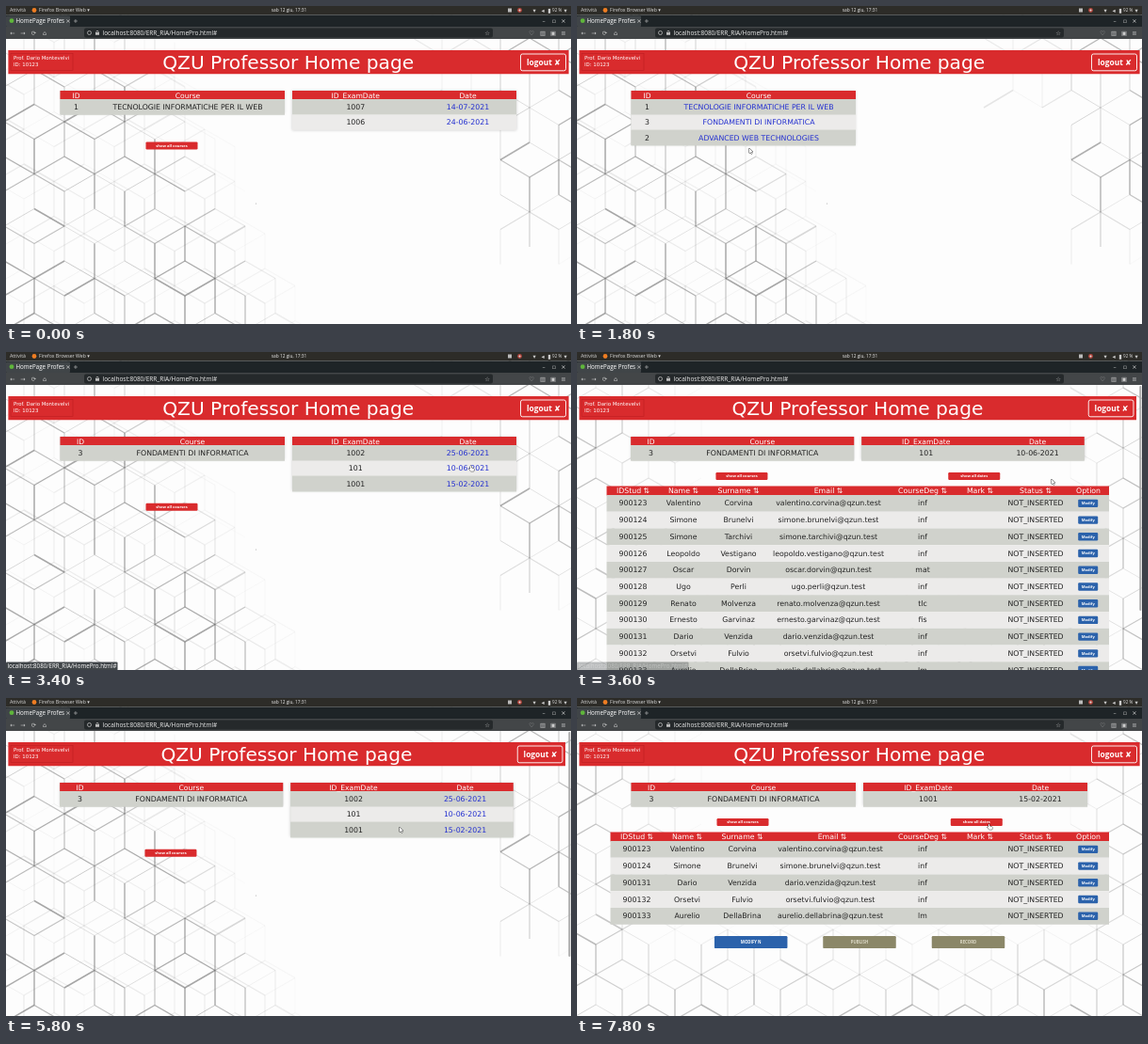
Write an HTML page with a canvas that moves like this. It is 600 px wide and 338 px high and loops after 8000 ms.

```html
<!DOCTYPE html>
<html lang="it">
<head>
<meta charset="utf-8">
<title>Professor Home page</title>
<style>
  html, body { margin: 0; width: 100%; height: 100%; overflow: hidden; background: #fff; }
  canvas { display: block; width: 600px; height: 338px; }
</style>
</head>
<body>
<canvas id="stage" width="600" height="338"></canvas>
<script>
const ctx = document.getElementById('stage').getContext('2d');
const LOOP = 8000, STEP = 200;
const WIDE = '"DejaVu Sans", sans-serif', UI = '"Open Sans", "Noto Sans", sans-serif';
const RED = '#d92b2d', BLUE = '#2b62ab', OLIVE = '#8b8768', LINK = '#2430d0', INK = '#222';
const STRIPES = ['#d0d2cc', '#ecebea'];
const URL_TEXT = 'localhost:8080/ERR_RIA/HomePro.html#';
const BODY = 7.8;

const FIRST = { id: 1, name: 'TECNOLOGIE INFORMATICHE PER IL WEB', dates: [['1007', '14-07-2021'], ['1006', '24-06-2021']] };
const BASICS = { id: 3, name: 'FONDAMENTI DI INFORMATICA', dates: [['1002', '25-06-2021'], ['101', '10-06-2021'], ['1001', '15-02-2021']] };
const WEB = { id: 2, name: 'ADVANCED WEB TECHNOLOGIES' };

const STUDENTS = [
  'Valentino Corvina inf', 'Simone Brunelvi inf', 'Simone Tarchivi inf', 'Leopoldo Vestigano inf',
  'Oscar Dorvin mat', 'Ugo Perli inf', 'Renato Molvenza tlc', 'Ernesto Garvinaz fis',
  'Dario Venzida inf', 'Orsetvi Fulvio inf', 'Aurelio DellaBrina lm', 'Marta Colvessi inf', 'Elisa Trondavi mat'
].map((line, i) => {
  const [first, last, degree] = line.split(' ');
  const email = `${first}.${last}@qzun.test`.toLowerCase();
  return [900123 + i, first, last, email, degree, '', 'NOT_INSERTED'];
});
const SHORT_LIST = [0, 1, 8, 9, 10].map(i => STUDENTS[i]);

// Each view lasts until its end time; k is the page width left beside the scrollbar.
const NARROW = 0.994;
const VIEWS = [
  { end: 1400, course: FIRST, k: 1 },
  { end: 2400, courses: [FIRST, BASICS, WEB], k: 1 },
  { end: 3600, course: BASICS, k: 1 },
  { end: 5800, course: BASICS, exam: 1, students: STUDENTS, k: NARROW },
  { end: 6200, course: BASICS, k: NARROW },
  { end: 6600, course: BASICS, k: 1 },
  { end: LOOP, course: BASICS, exam: 2, students: SHORT_LIST, k: 1 }
];

// time, x, y of the pointer
const POINTER = [
  [0, 505, -12], [200, 502, 6], [600, 491, 106], [1000, 240, 140], [1200, 182, 147], [1400, 182, 147],
  [1800, 183, 151], [2200, 192, 123], [2500, 192, 123], [3000, 466, 121], [3400, 493, 121],
  [3600, 504, 135], [4000, 515, 170], [4800, 512, 170], [5400, 425, 140], [5600, 414, 132],
  [5800, 418, 137], [6200, 487, 137], [6600, 488, 139], [7000, 300, 220], [7200, 209, 253],
  [7400, 541, 229], [7600, 470, 170], [7800, 437, 134], [LOOP, 437, 134]
];

const clamp = v => Math.max(0, Math.min(1, v));
const within = (t, ranges) => ranges.some(([a, b]) => t >= a && t < b);
const random = n => { const v = Math.sin(n * 12.9898) * 43758.5453; return v - Math.floor(v); };

function rect(x, y, w, h, color, radius = 0) {
  ctx.fillStyle = color;
  ctx.beginPath();
  ctx.roundRect(x, y, w, h, radius);
  ctx.fill();
}

function dot(x, y, r, color) {
  rect(x - r, y - r, 2 * r, 2 * r, color, r);
}

// y is the middle of the capital letters
function text(s, x, y, size, color = INK, align = 'center', font = WIDE, weight = '') {
  ctx.font = `${weight} ${size}px ${font}`;
  ctx.textAlign = align;
  ctx.fillStyle = color;
  ctx.fillText(s, x, y + size * 0.36);
}

function button(s, x, y, w, h, color, size = 4.1, ink = '#fff') {
  rect(x - w / 2, y - h / 2, w, h, color, 1.2);
  text(s, x, y, size, ink, 'center', UI, 'bold');
}

function pointerAt(t) {
  const i = Math.max(1, POINTER.findIndex(p => p[0] >= t));
  const [t0, x0, y0] = POINTER[i - 1], [t1, x1, y1] = POINTER[i];
  const p = (t - t0) / (t1 - t0);
  return [x0 + (x1 - x0) * p, y0 + (y1 - y0) * p];
}

// Lattice of wireframe cubes, fading by weight(x, y)
function cubes(cx, cy, half, side, strength, weight, seed) {
  const low = side / 2;
  const edges = [
    [0, 0, -half, -low], [0, 0, half, -low], [0, 0, 0, side],
    [0, -side, half, -low], [half, -low, half, low], [half, low, 0, side]
  ];
  for (let row = -8; row < 10; row++) for (let col = -10; col < 14; col++) {
    const x = cx + col * 2 * half + (row & 1) * half, y = cy + row * 1.5 * side;
    edges.forEach(([ax, ay, bx, by], e) => {
      const shade = random(seed + row * 131 + col * 17 + e * 3.7);
      const alpha = strength * clamp(weight(x + (ax + bx) / 2, y + (ay + by) / 2)) * (0.4 + 0.6 * shade);
      if (alpha < 0.02) return;
      ctx.strokeStyle = `rgba(95,95,95,${alpha})`;
      ctx.lineWidth = 0.7 + 0.8 * shade;
      ctx.beginPath();
      ctx.moveTo(x + ax, y + ay);
      ctx.lineTo(x + bx, y + by);
      ctx.stroke();
    });
  }
}

function background(students) {
  if (students) {
    const edge = (x, y) => Math.max(1 - x / 140, (x - 510) / 80, (y - 225) / 110);
    cubes(20, 70, 28, 32, 0.45, edge, 5);
    return;
  }
  const left = (x, y) => (165 + 0.5 * (y - 35) - x) / 70;
  const right = (x, y) => Math.min((270 - y) / 70, Math.max((x - 515) / 25, x > 440 && y < 115 ? 0.3 : 0));
  cubes(190, 197, 32, 37, 0.55, left, 1);
  cubes(211, 205, 32, 37, 0.13, (x, y) => left(x - 25, y), 40);
  cubes(556, 182, 31, 37, 0.5, right, 9);
  dot(265.5, 210, 0.6, '#aaa');
}

function table(x0, x1, heads, columns, rows, linked, k) {
  const x = x0 * k, w = (x1 - x0) * k, bottom = 99 + rows.length * 16.4;
  ctx.shadowColor = 'rgba(0,0,0,.2)';
  ctx.shadowBlur = 3;
  rect(x, 90, w, bottom - 90, STRIPES[1 - rows.length % 2]);
  ctx.shadowBlur = 0;
  rect(x, 90, w, 9, RED);
  rows.forEach((row, i) => {
    const y = 99 + i * 16.4;
    rect(x, y, w, 16.4, STRIPES[i % 2]);
    text(row[0], columns[0] * k, y + 8.2, BODY);
    text(row[1], columns[1] * k, y + 8.2, BODY, linked ? LINK : INK);
  });
  heads.forEach((s, i) => text(s, columns[i] * k, 94.8, 7.6, '#fff'));
  return bottom;
}

function studentTable(students, k) {
  const left = k < 1 ? 31.5 : 35.5, shift = k < 1 ? 0 : 4;
  const columns = [59.5, 113, 171.5, 267, 367, 428, 487, 543].map((x, i) => x + (i < 4 ? shift : 0));
  const top = 152, pitch = 17.72;
  rect(left, 142.5, 565 - left, 10, RED);
  ['IDStud', 'Name', 'Surname', 'Email', 'CourseDeg', 'Mark', 'Status', 'Option'].forEach((s, i) =>
    text(i < 7 ? s + ' ⇅' : s, columns[i], 147.3, 7.8, '#fff'));
  students.forEach((row, i) => {
    const y = top + i * pitch, middle = y + pitch / 2;
    rect(left, y, 565 - left, pitch + 0.1, STRIPES[i % 2]);
    row.forEach((s, c) => text(s, columns[c] - (c === 3 ? shift / 2 : 0), middle - 0.3, BODY));
    button('Modify', 542.7, middle, 21, 8.4, BLUE);
  });
  const y = top + students.length * pitch + 19;
  button('MODIFY N', 184.7 * k, y, 77.5, 13, BLUE, 4.3);
  button('PUBLISH', 300 * k, y, 77.5, 13, OLIVE, 4.3, '#dedbc8');
  button('RECORD', 415.5 * k, y, 77.5, 13, OLIVE, 4.3, '#dedbc8');
}

function banner(k) {
  rect(2.4 * k, 47, 595.2 * k, 25.3, RED);
  ctx.strokeStyle = 'rgba(170,20,25,.6)';
  ctx.lineWidth = 0.6;
  ctx.strokeRect(5, 50.5, 66, 18);
  text('Prof. Dario Montevelvi', 8, 55.3, 5.4, '#fff', 'left');
  text('ID: 10123', 8, 61.8, 5.4, '#fff', 'left');
  text('QZU Professor Home page', 299.7 * k, 59.8, 20.2, '#fff');
  ctx.strokeStyle = '#fff';
  ctx.lineWidth = 0.9;
  ctx.beginPath();
  ctx.roundRect(546.5 * k, 51, 48 * k, 17.8, 2);
  ctx.stroke();
  text('logout ✘', 571 * k, 60, 8.4, '#fff', 'center', UI + ', "DejaVu Sans"', 'bold');
}

function page(view) {
  const { course, courses, exam, students, k } = view;
  background(students);
  banner(k);
  const columns = courses || course === FIRST ? [74.5, 193] : [79, 198];
  const list = courses || [course];
  table(57.5, 296, ['ID', 'Course'], columns, list.map(c => [c.id, c.name]), Boolean(courses), k);
  if (courses) return;
  const picked = exam !== undefined;
  const dates = picked ? [course.dates[exam]] : course.dates;
  const bottom = table(304, 542, ['ID_ExamDate', 'Date'], picked ? [373, 492] : [371.3, 490.5], dates, !picked, k);
  button('show all courses', 176 * k, bottom + 16.6, 55, 8, RED);
  if (!picked) return;
  button('show all dates', 424.3 * k, bottom + 16.6, 55, 8, RED);
  studentTable(students, k);
}

function browser() {
  rect(0, 0, 600, 9.5, '#2d2c28');
  rect(0, 9.5, 600, 12.5, '#1e2427');
  rect(0, 10.5, 68, 11.5, '#404548', 1);
  rect(0, 22, 600, 13, '#434648');
  rect(83, 23.5, 434, 10, '#25292b', 2);

  const note = (s, x, y, size = 5.2, color = '#ddd', align = 'left') => text(s, x, y, size, color, align, UI);
  note('Attività', 4, 4.5);
  dot(30, 4.5, 2.4, '#ef7d22');
  note('Firefox Browser Web ▾', 35, 4.5);
  note('sab 12 giu, 17:31', 300.5, 4.5, 4.8, '#eee', 'center');
  note('92 %', 580, 4.5, 4.6);
  rect(533, 2.5, 4, 4, '#bbb');
  dot(545.5, 4.5, 2.4, '#b5463d');
  dot(545.5, 4.5, 1, '#ddd');

  dot(6, 15.7, 2.4, '#5fb53b');
  note('HomePage Profes', 10.5, 15.7, 6.2, '#fff');
  note(URL_TEXT, 102.5, 28.5, 6.5, '#eee');

  const icons = [
    ['×', 66, 15.7], ['+', 74, 15.7], ['←', 7, 28.5], ['→', 18, 28.5], ['⟳', 29.5, 28.5], ['⌂', 41, 28.5],
    ['☆', 511, 28.5], ['▾', 561, 4.5], ['◂', 570, 4.5], ['▮', 577, 4.5], ['▾', 594, 4.5],
    ['–', 571, 15.7], ['▫', 582, 15.7], ['×', 592, 15.7],
    ['♡', 558, 28.5], ['▥', 570, 28.5], ['▣', 581, 28.5], ['≡', 592, 28.5]
  ];
  icons.forEach(([s, x, y]) => text(s, x, y, 6.4, '#ccc'));
  ctx.strokeStyle = '#bbb';
  ctx.lineWidth = 0.8;
  ctx.beginPath();
  ctx.arc(88.5, 28.5, 2, 0, 7);
  ctx.moveTo(98.2, 28);
  ctx.arc(97, 27.6, 1.2, 0, Math.PI, true);
  ctx.stroke();
  rect(95, 28, 4, 2.8, '#bbb');
}

function status(alpha) {
  ctx.globalAlpha = alpha;
  rect(0, 329.5, 118.5, 9, '#404548', 1);
  text(URL_TEXT, 1.5, 333.8, 6.2, '#fff', 'left', UI);
  ctx.globalAlpha = 1;
}

function pointer(x, y, hand) {
  const arrow = 'M0 0V5.4L1.3 4.3L2.2 6.2L3 5.8L2.2 4H3.8Z';
  const palm = 'M0 0.4Q.6-.4 1.1.4V2.2L3.6 2.8Q4.2 3.2 3.8 5.8H.5L-1.3 3.4L-.8 3L0 3.6Z';
  const shape = new Path2D(hand ? palm : arrow);
  ctx.save();
  ctx.translate(x, y);
  ctx.strokeStyle = '#222';
  ctx.lineWidth = 0.9;
  ctx.fillStyle = '#fff';
  ctx.stroke(shape);
  ctx.fill(shape);
  ctx.restore();
}

function draw(t) {
  const view = VIEWS.find(v => t < v.end);
  const scroll = within(t, [[4000, 4800]]) ? 81.5 : 0;

  ctx.fillStyle = '#fdfdfd';
  ctx.fillRect(0, 0, 600, 338);
  ctx.save();
  ctx.translate(0, -scroll);
  page(view);
  ctx.restore();
  if (view.k < 1) rect(597.3, 36 + scroll * 0.78, 2, 239, '#aaa', 1);
  browser();

  if (within(t, [[600, 800], [2000, 2400], [3000, 3600], [6200, 6600]])) status(1);
  else if (within(t, [[3600, 3800]])) status(0.35);

  const hand = within(t, [[600, 800], [1200, 1400], [2000, 2400], [3000, 3600], [5600, 5800], [6200, 6600], [7200, 7600], [7800, LOOP]]);
  pointer(...pointerAt(t), hand);
}

let shown = -1;
function frame(now) {
  const t = Math.floor((now % LOOP) / STEP) * STEP;
  if (t !== shown) draw(shown = t);
  requestAnimationFrame(frame);
}
requestAnimationFrame(frame);
</script>
</body>
</html>
```
